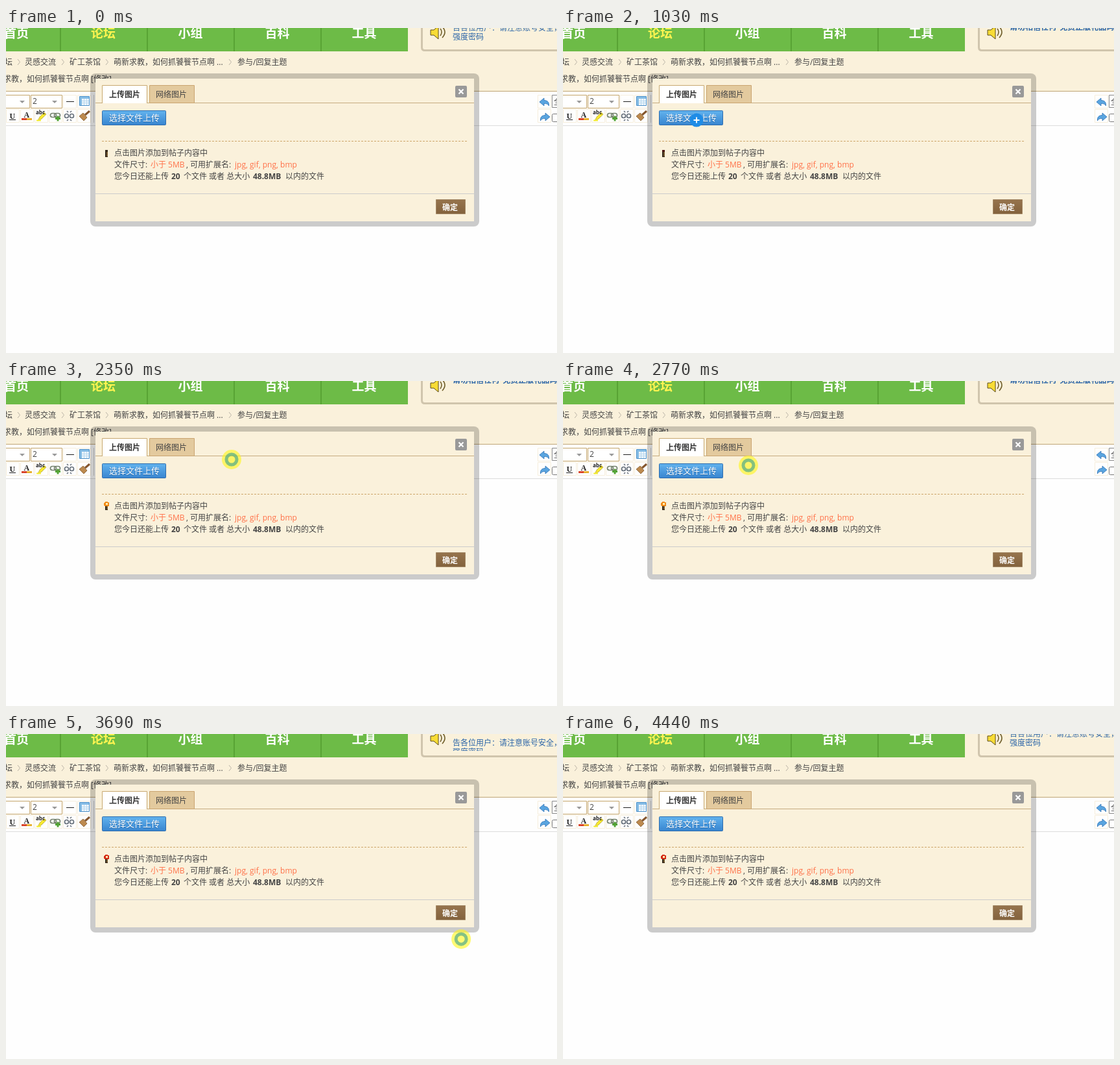
An HTML page that plays this animation: 850 by 501 pixels, repeating every 4770 ms.

```html
<!DOCTYPE html>
<html lang="zh-CN">
<head>
<meta charset="utf-8">
<style>
html, body { margin: 0; width: 100%; height: 100%; overflow: hidden; background: #fefefe; }
svg { display: block; width: 850px; height: 501px; }
text { font: 12px "Open Sans", "Noto Sans CJK SC", "Noto Sans CJK", sans-serif; fill: #444; white-space: pre; }
.b { font-weight: 700; }
.nav text { font-size: 19px; font-weight: 700; fill: #fff; text-anchor: middle; }
.hot { fill: #ff7148; }
.news text { fill: #2b65a8; }
.line { fill: none; stroke-width: 1; }
</style>
</head>
<body>
<svg viewBox="0 0 850 501">
  <defs>
    <linearGradient id="blue" x2="0" y2="1"><stop stop-color="#62b3ee"/><stop offset="1" stop-color="#3885d0"/></linearGradient>
    <linearGradient id="brown" x2="0" y2="1"><stop stop-color="#96744d"/><stop offset="1" stop-color="#83623d"/></linearGradient>
    <clipPath id="newsBox"><path d="M685 0H850V26H685Z"/></clipPath>
    <path id="drop" d="M0 0h8l-4 4z" fill="#999"/>
    <path id="sep" class="line" d="M0 0l3.5 4.5L0 9" stroke="#b9b3a6"/>
    <path id="cell" class="line" d="M.5 .5h20v20h-20z" stroke="#f6eedc"/>
    <path id="back" d="M0 6L7 0V3.5C13 3.5 15 7 14.5 12C13 9 11 8.500 7 8.500V12Z" fill="#5aa5e0" stroke="#2f73b5" stroke-width=".8"/>
  </defs>

  <!-- page header -->
  <path d="M0 0H850V97H0Z" fill="#faf1db"/>
  <g class="nav">
    <path d="M0 0H620V36H0Z" fill="#6dbb47"/>
    <path d="M84 0V36M218 0V36M352 0V36M486 0V36" stroke="#58a334" stroke-width="2"/>
    <text x="16" y="15">首页</text>
    <text x="150" y="15" style="fill:#fff450">论坛</text>
    <text x="284.500" y="15">小组</text>
    <text x="418.500" y="15">百科</text>
    <text x="552.500" y="15">工具</text>
  </g>
  <path d="M641.5 0V30Q641.5 34.5 646 34.5H850" fill="none" stroke="#d0c5ad" stroke-width="3"/>
  <path d="M655 3h5l7-6v20l-7-6h-5z" fill="#f8dc35" stroke="#5a4a1c"/>
  <path d="M670 1q4 5 0 11M673 -2q8 8 0 17" fill="none" stroke="#6b5a25" stroke-width="1.5"/>
  <g class="news" clip-path="url(#newsBox)">
    <g id="safety"><text x="689" y="4">告各位用户：请注意账号安全，</text><text x="689" y="18">强度密码</text></g>
    <text id="gift" class="b" x="689" y="3">请勿相信任何“免费正版礼品码”</text>
  </g>

  <text x="-2" y="57">坛</text>
  <text x="29" y="57">灵感交流</text>
  <text x="98" y="57">矿工茶馆</text>
  <text x="166" y="57">萌新求教，如何抓饕餮节点啊 ...</text>
  <text x="357" y="57">参与/回复主题</text>
  <use href="#sep" x="18" y="48"/><use href="#sep" x="86" y="48"/><use href="#sep" x="154" y="48"/><use href="#sep" x="344" y="48"/>
  <text x="-4" y="83">求教，如何抓饕餮节点啊</text>
  <text x="131" y="83">[修改]</text>

  <!-- editor toolbar -->
  <path class="line" d="M0 97.5H850" stroke="#bfa677"/>
  <path class="line" d="M0 150.500H850" stroke="#dcdcdc"/>
  <path class="line" d="M135.500 103V146" stroke="#ccc"/>
  <path d="M-5 103.500H36.500V123.500H-5M38.500 103.500H86.500V123.500H38.500Z" fill="#fff" stroke="#c4a469"/>
  <use href="#drop" x="21" y="112"/><use href="#drop" x="71" y="112"/>
  <text x="41" y="117">2</text>
  <g id="cells"></g>
  <path d="M93 113.500H105" stroke="#222"/>
  <path d="M113.500 105.500h15v14h-15z" fill="#eef7fd" stroke="#4a8fc7"/>
  <path d="M114 107.500H128M115.500 108V119" fill="none" stroke="#86bde6" stroke-width="3"/>
  <path class="line" d="M120.500 109V119M124.500 109V119M117 112.500H128M117 115.500H128" stroke="#b9d8ee"/>
  <text class="b" x="5.500" y="140" style="font-family:'Liberation Serif',serif;fill:#222">U</text>
  <path d="M5 141.500H15" stroke="#222"/>
  <text class="b" x="27.500" y="138" style="font-family:'Liberation Serif',serif;fill:#222">A</text>
  <path d="M24 140.500H32" stroke="#d8432b" stroke-width="3"/><path d="M32 140.500H40" stroke="#e8b02e" stroke-width="3"/>
  <path d="M49 143L52 137L59 130L62 133L55 140Z" fill="#f8e930" stroke="#b5a33a" stroke-width=".8"/>
  <path d="M47 142.500H54" stroke="#f5ee2d" stroke-width="2"/>
  <text class="b" x="46" y="133" style="font-size:8px;fill:#222">abc</text>
  <g fill="none" stroke="#76836f" stroke-width="1.700">
    <rect x="68.500" y="131.500" width="9" height="6" rx="3"/><rect x="74.500" y="131.500" width="9" height="6" rx="3"/>
    <g stroke="#68717c"><rect x="90.500" y="132.500" width="6" height="6" rx="3"/><rect x="98.500" y="132.500" width="6" height="6" rx="3"/><path d="M96 130l-2-2M99 130l2-2M96 141l-2 2M99 141l2 2"/></g>
  </g>
  <path d="M76 139.500H84M80 135.500V143.500" stroke="#52a335" stroke-width="3"/>
  <path d="M129 128L122 134" stroke="#85562e" stroke-width="3"/>
  <path d="M119 131L125 138L120 143L113 136Z" fill="#bd8a4f" stroke="#815a2e" stroke-width=".8"/>
  <use href="#back" x="823" y="108"/>
  <use href="#back" transform="translate(839 131) scale(-1 1)"/>
  <path d="M842.500 103.500H860V122.500H842.500Z" fill="#fff" stroke="#888"/>
  <text x="845" y="118">全</text>
  <rect x="842.500" y="132.500" width="12" height="12" rx="2" fill="#fff" stroke="#777"/>

  <!-- dialog -->
  <rect x="130" y="70" width="600" height="236" rx="8" opacity=".2"/>
  <path d="M138 78H722V298H138Z" fill="#faf1db"/>
  <path class="line" d="M138 115.500H722" stroke="#c5ab80"/>
  <path d="M148.500 116V88.500H217.500V116" fill="#fff" stroke="#c8a970"/>
  <path d="M221.500 88.500H290.500V115.500H221.500Z" fill="#e3ca9e" stroke="#caa570"/>
  <text class="b" x="159" y="107" style="fill:#333">上传图片</text>
  <text x="231" y="107">网络图片</text>
  <rect x="693" y="89" width="18" height="18" rx="2" fill="#999"/>
  <path d="M698.500 94.500l7 7m0-7l-7 7" stroke="#fff" stroke-width="2.200"/>
  <rect x="148.500" y="127.500" width="98" height="22" rx="1" fill="url(#blue)" stroke="#2c6cae"/>
  <text x="159" y="143" style="font-size:13px;fill:#fff;text-shadow:0 1px 1px #2467a5">选择文件上传</text>
  <path class="line" d="M148 174.500H712" stroke="#cda568" stroke-dasharray="3 2"/>

  <g id="torch">
    <path d="M153 188h4v11h-4z" fill="#33271a"/>
    <path d="M155 190h2v8h-2z" fill="#765b32"/>
    <g id="flame">
      <path d="M152 187h7v6h-7z"/>
      <path d="M153 186h4v1h-4zM151 188h1v4h-1z"/>
      <path d="M154 188h3v3h-3z" fill="#fff0b5"/>
    </g>
    <path id="ember" d="M153 188h4v3h-4z"/>
  </g>
  <text x="167" y="197">点击图片添加到帖子内容中</text>
  <text x="167" y="215">文件尺寸:</text>
  <text class="hot" x="223" y="215">小于 5MB</text>
  <text x="278" y="215">, 可用扩展名:</text>
  <text class="hot" x="353" y="215">jpg, gif, png, bmp</text>
  <text x="167" y="233">您今日还能上传</text>
  <text class="b" x="255" y="233">20</text>
  <text x="274" y="233">个文件 或者 总大小</text>
  <text class="b" x="381" y="233">48.8MB</text>
  <text x="431" y="233">以内的文件</text>

  <path class="line" d="M138 255.500H722" stroke="#ccc"/>
  <path d="M663.500 264.500H708.500V286.500H663.500Z" fill="url(#brown)" stroke="#a48a68"/>
  <text class="b" x="673" y="280.500" style="fill:#fff">确定</text>

  <!-- pointer -->
  <g id="pointer">
    <g id="ring">
      <circle r="15" fill="#fff616" opacity=".6"/>
      <circle r="8" fill="none" stroke="#43a48c" stroke-width="5" opacity=".65"/>
    </g>
    <g id="plus">
      <circle r="10.500" fill="#1f8ce6"/>
      <path d="M-4.500 0H4.500M0 -4.500V4.500" stroke="#fff" stroke-width="2"/>
    </g>
  </g>
</svg>
<script>
const $ = id => document.getElementById(id);
const LOOP = 4770;
// The picture advances in eight even steps per span.
const spans = [200, 750, 1300, 1860, 2420, 2980, 3550, 4100, 4640];
// time, x, y
const path = [
  [340, 835, 486], [480, 650, 360], [680, 389, 226], [890, 250, 162], [1025, 206, 142],
  [1580, 206, 142], [1650, 203, 140], [1930, 203, 140], [2350, 348, 121],
  [2560, 347, 152], [2770, 286, 130], [2910, 409, 163], [3122, 775, 265],
  [3336, 693, 285], [3545, 693, 285], [3687, 702, 316], [4028, 794, 444], [4170, 817, 490]
];
const torch = [
  [0, 'off'], [480, 'orange'], [960, 'out'], [1370, 'red'], [1790, 'off'],
  [2210, 'orange'], [2980, 'out'], [3545, 'red'], [4030, 'out'], [4435, 'red']
];
const flames = { orange: '#f28a16', red: '#d52b17' };
const ROLL = 42;

const addCell = (x, y) => $('cells').innerHTML += `<use href="#cell" x="${x}" y="${y}"/>`;
for (let x = 0; x < 132; x += 22) addCell(x, 125);
for (const x of [88, 110, 820]) addCell(x, 103);
addCell(820, 125);

const clamp = v => Math.max(0, Math.min(1, v));

function stepped(t) {
  const i = spans.findLastIndex(s => s <= t);
  if (i < 0 || i === spans.length - 1) return t;
  const step = (spans[i + 1] - spans[i]) / 8;
  return spans[i] + Math.floor((t - spans[i]) / step) * step;
}

function place(t) {
  const i = path.findLastIndex(p => p[0] <= t);
  const [t0, x0, y0] = path[Math.max(i, 0)];
  const [t1, x1, y1] = path[Math.min(i + 1, path.length - 1)];
  const k = t1 > t0 ? (t - t0) / (t1 - t0) : 0;
  return [x0 + (x1 - x0) * k, y0 + (y1 - y0) * k];
}

const show = (id, on) => $(id).setAttribute('visibility', on ? 'visible' : 'hidden');
const move = (id, x, y) => $(id).setAttribute('transform', `translate(${x} ${y})`);

function draw(now) {
  const t = stepped(now % LOOP);

  const away = Math.round(ROLL * clamp((t - 200) / 420));
  const back = Math.round(ROLL * clamp((t - 3410) / 420));
  move('safety', 0, t < 3410 ? -away : ROLL - back);
  move('gift', 0, ROLL - away - back);

  const state = torch.findLast(s => s[0] <= t)[1];
  const lit = state in flames;
  show('flame', lit);
  $('flame').setAttribute('fill', flames[state] || 'none');
  show('ember', !lit);
  $('ember').setAttribute('fill', state === 'out' ? '#4a100c' : '#33271a');

  const seen = t >= 340 && t < 4230;
  const hover = t >= 1020 && t < 1645;
  move('pointer', ...place(t));
  show('ring', seen && !hover);
  show('plus', seen && hover);
  requestAnimationFrame(draw);
}
draw(0);
</script>
</body>
</html>
```
